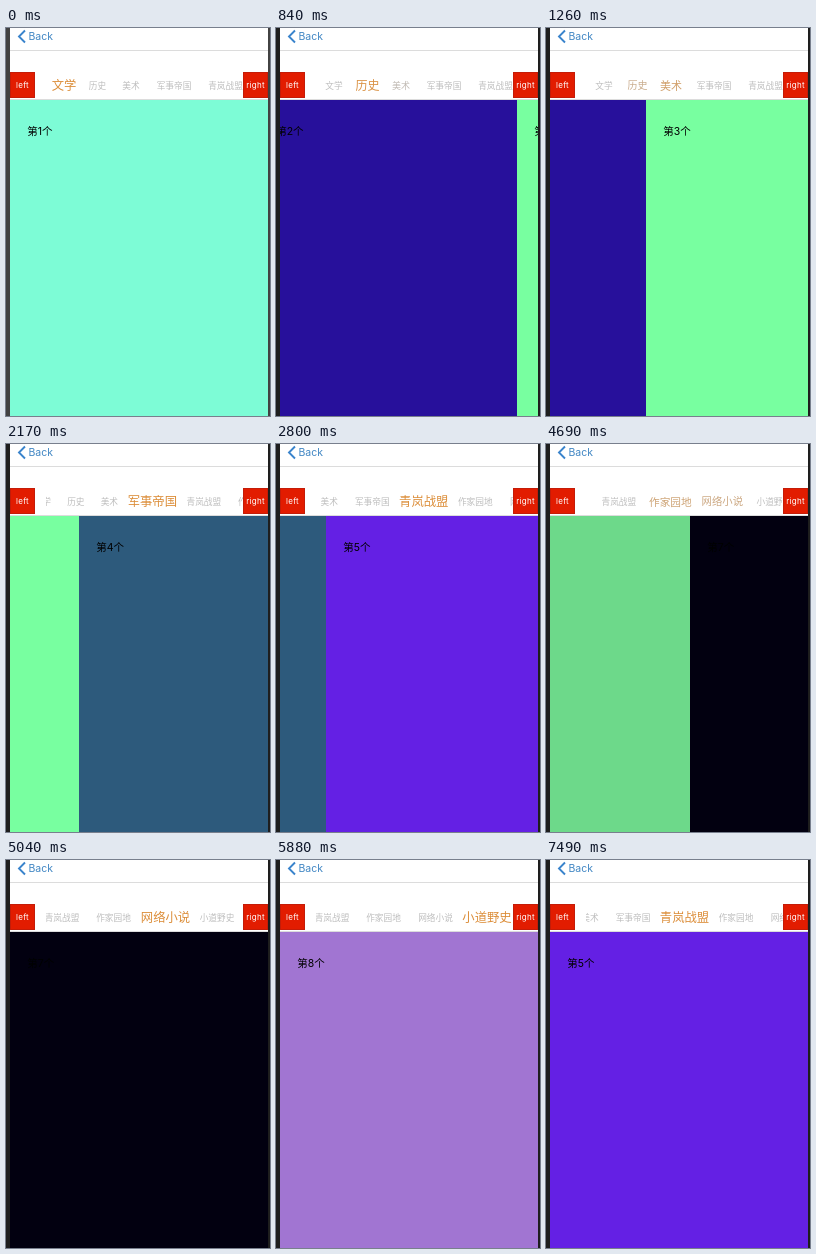
These frames come from a looping animation (264 by 388 pixels, 7.63 s). An HTML page:

```html
<!DOCTYPE html>
<html lang="zh">
<head>
<meta charset="utf-8">
<style>
  html, body { margin: 0; width: 100%; height: 100%; overflow: hidden; }
  #stage {
    position: relative; width: 264px; height: 388px; overflow: hidden;
    background: #1e1e1e; font-family: Inter, "Noto Sans CJK SC", "Noto Sans CJK", sans-serif;
  }
  #stage * { position: absolute; white-space: nowrap; box-sizing: border-box; }
  #screen { left: 4px; top: 0; width: 258px; height: 388px; background: #fff; overflow: hidden; }
  #chevron { left: 7px; top: 1px; }
  #back { left: 18.5px; top: 1px; font-size: 10.5px; line-height: 15px; color: #4287c4; }
  .rule { left: 0; width: 258px; height: 1px; background: #dcdcdc; }
  .button {
    top: 44px; width: 25px; height: 26px; background: #e21c00; color: #fff;
    box-shadow: inset 0 0 0 1px #c41c08;
    font-size: 8px; letter-spacing: 0.25px; line-height: 26px; text-align: center;
  }
  #tabs { left: 36px; top: 44px; width: 197px; height: 26px; overflow: hidden; }
  .tab { top: 0; line-height: 29px; font-size: 8.7px; }
  #pages { left: 0; top: 72px; width: 258px; height: 316px; overflow: hidden; }
  .page { left: 0; top: 0; width: 258px; height: 316px; }
  .page span { left: 17.2px; top: 24px; font-size: 10.5px; line-height: 15px; color: #000; }
</style>
</head>
<body>
<div id="stage">
  <div id="screen">
    <svg id="chevron" width="10" height="15" fill="none" stroke="#3a84cc" stroke-width="1.9">
      <path d="M8 1.5L2 7.5L8 13.5"/>
    </svg>
    <div id="back">Back</div>
    <div class="rule" style="top:22px"></div>
    <div id="tabs"></div>
    <div class="button" style="left:0">left</div>
    <div class="button" style="left:233px">right</div>
    <div class="rule" style="top:71px"></div>
    <div id="pages"></div>
  </div>
</div>
<script>
const LOOP = 7630, PAGE_WIDTH = 258, BAR_CENTER = 98.5, MAX_SCROLL = 163.5;
// title, centre in the scrolling bar, page colour
const items = [
  ['文学', 18, '#7dfcd6'], ['历史', 51.5, '#27109b'],
  ['美术', 85, '#78ffa0'], ['军事帝国', 128, '#2d5a7c'],
  ['青岚战盟', 179.5, '#6420e4'], ['作家园地', 231, '#6dd98a'],
  ['网络小说', 283, '#020010'], ['小道野史', 334.5, '#a175d2']
];

const smooth = s => s * s * (3 - 2 * s);
const drag = s => smooth(s) ** 2;
const flick = power => s => 1 - (1 - s) ** power;

// start, end, from, to, easing
const swipes = [
  [40, 280, 0, 1, flick(1.6)],
  [418, 1610, 1, 2, drag],
  [1890, 2450, 2, 3, flick(1.9)],
  [2520, 2940, 3, 4, flick(1.55)],
  [3570, 4340, 4, 5, flick(2.29)],
  [4550, 5040, 5, 6, flick(1.8)],
  [5320, 5670, 6, 7, flick(1.7)],
  [6720, 7140, 7, 4, smooth]
];

const stage = document.getElementById('stage');
const add = (parent, className, text) => {
  const el = document.createElement('div');
  el.className = className;
  el.textContent = text;
  return document.getElementById(parent).appendChild(el);
};
const tabs = items.map(([name]) => add('tabs', 'tab', name));
const pages = items.map(([, , color], i) => {
  const page = add('pages', 'page', '');
  page.style.background = color;
  page.innerHTML = `<span>第${i + 1}个</span>`;
  return page;
});

const clamp = (v, lo, hi) => Math.min(hi, Math.max(lo, v));
const mix = (a, b, k) => a + (b - a) * k;
const scrollFor = i => clamp(items[i][1] - BAR_CENTER, 0, MAX_SCROLL);
const tabColor = k => `rgb(${mix(190, 220, k)}, ${mix(190, 142, k)}, ${mix(190, 58, k)})`;

function render(t) {
  const [start, end, from, to, ease] = swipes.findLast(s => s[0] <= t) || swipes[0];
  const progress = ease(clamp((t - start) / (end - start), 0, 1));
  const position = mix(from, to, progress);
  const scroll = mix(scrollFor(from), scrollFor(to), progress);
  const focus = progress > 0.7 ? 1 : progress;

  pages.forEach((page, i) => {
    page.style.transform = `translateX(${Math.round((i - position) * PAGE_WIDTH)}px)`;
  });
  tabs.forEach((tab, i) => {
    const k = i === to ? focus : i === from ? 1 - focus : 0;
    tab.style.transform =
      `translateX(${items[i][1] - scroll}px) translateX(-50%) scale(${1 + 0.42 * k})`;
    tab.style.color = tabColor(k);
  });
  stage.style.background = t < 490 ? '#424242' : '#1e1e1e';
}

const origin = performance.now();
function tick() {
  render((performance.now() - origin) % LOOP);
  requestAnimationFrame(tick);
}
tick();
</script>
</body>
</html>
```
